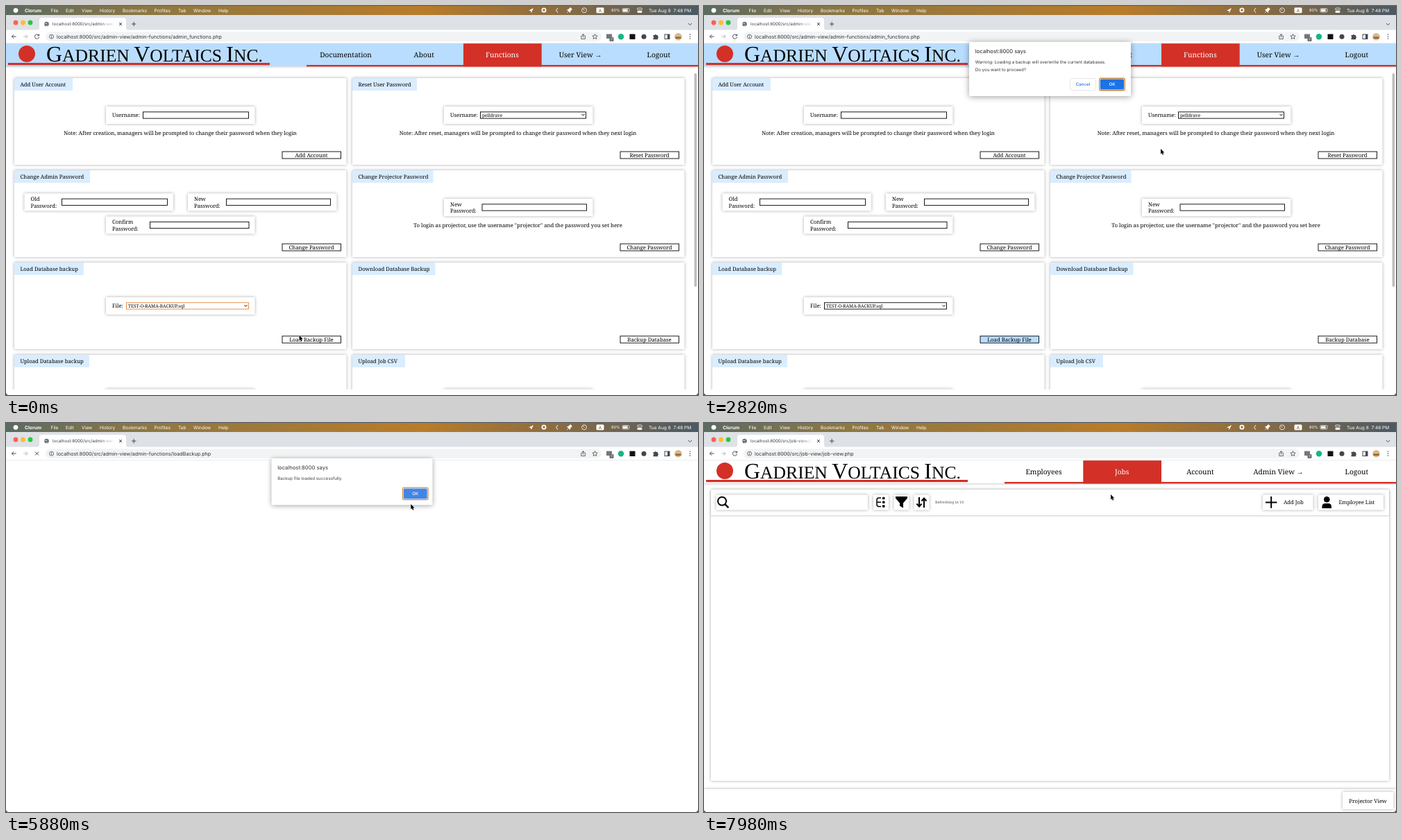
These frames come from a looping animation (997x561 px, 8000 ms). An HTML page:

```html
<!DOCTYPE html>
<html lang="en">
<head>
<meta charset="utf-8">
<title>Database backup</title>
<style>
html, body { margin: 0; width: 100%; height: 100%; overflow: hidden; background: #fff; text-rendering: geometricPrecision; }
svg { position: absolute; left: 0; top: 0; }
text { font-family: "Noto Serif", serif; white-space: pre; }
.ui text { font-family: Inter, sans-serif; }
.soft { filter: drop-shadow(0 0 2.1px #0005); }
.icon { fill: none; stroke: #444a50; stroke-width: 1; }
.mid { text-anchor: middle; }
#dump { position: absolute; left: 4.2px; top: 58px; width: 981px; height: 503px; overflow: hidden;
  font: 8.31px/9.35px "Liberation Serif", serif; }
</style>
</head>
<body>
<div id="dump">
string(27999) "-- MySQL dump 10.13 Distrib 8.0.33, for Linux (x86_64) -- -- Host: mysql-server Database: GV_Schema -- ------------------------------------------------------ -- Server version 8.0.33 /*!40101 SET @OLD_CHARACTER_SET_CLIENT=@@CHARACTER_SET_CLIENT */;<br>
/*!40101 SET @OLD_CHARACTER_SET_RESULTS=@@CHARACTER_SET_RESULTS */; /*!40101 SET @OLD_COLLATION_CONNECTION=@@COLLATION_CONNECTION */; /*!50503 SET NAMES utf8mb4 */; /*!40103 SET @OLD_TIME_ZONE=@@TIME_ZONE */; /*!40103 SET TIME_ZONE='+00:00' */; /*!40014 SET @OLD_UNIQUE_CHECKS=@@UNIQUE_CHECKS, UNIQUE_CHECKS=0 */; /*!40014 SET @OLD_FOREIGN_KEY_CHECKS=@@FOREIGN_KEY_CHECKS, FOREIGN_KEY_CHECKS=0 */; /*!40101 SET @OLD_SQL_MODE=@@SQL_MODE, SQL_MODE='NO_AUTO_VALUE_ON_ZERO' */; /*!40111 SET @OLD_SQL_NOTES=@@SQL_NOTES, SQL_NOTES=0 */; -- -- Table structure for table `assignments` -- DROP TABLE IF EXISTS `assignments`; /*!40101 SET @saved_cs_client = @@character_set_client */; /*!50503 SET character_set_client = utf8mb4 */; CREATE TABLE `assignments` ( `assignment_id` int NOT NULL AUTO_INCREMENT, `employee_id` int DEFAULT NULL, `job_id` int DEFAULT NULL, `start_date` date DEFAULT NULL, `end_date` date DEFAULT NULL, `assigner` int DEFAULT NULL, PRIMARY KEY (`assignment_id`), KEY `employee_id` (`employee_id`), KEY `job_id` (`job_id`), KEY `assigner` (`assigner`), CONSTRAINT `assignments_ibfk_1` FOREIGN KEY (`employee_id`) REFERENCES `employee` (`id`) ON DELETE CASCADE, CONSTRAINT `assignments_ibfk_2` FOREIGN KEY (`job_id`) REFERENCES `job` (`id`) ON DELETE CASCADE, CONSTRAINT `assignments_ibfk_3` FOREIGN KEY (`assigner`) REFERENCES `user` (`id`) ON DELETE CASCADE ) ENGINE=InnoDB AUTO_INCREMENT=13 DEFAULT CHARSET=utf8mb4 COLLATE=utf8mb4_0900_ai_ci; /*!40101 SET character_set_client = @saved_cs_client */; -- -- Dumping data for table `assignments` -- LOCK TABLES `assignments` WRITE; /*!40000 ALTER TABLE `assignments` DISABLE KEYS */; INSERT INTO `assignments` VALUES <span id="assignments"></span>; /*!40000<br>
ALTER TABLE `assignments` ENABLE KEYS */; UNLOCK TABLES; -- -- Table structure for table `employee` -- DROP TABLE IF EXISTS `employee`; /*!40101 SET @saved_cs_client = @@character_set_client */; /*!50503 SET character_set_client = utf8mb4 */; CREATE TABLE `employee` ( `id` int NOT NULL AUTO_INCREMENT, `role` int DEFAULT NULL, `name` varchar(100) DEFAULT NULL, `active` int DEFAULT '0', `archived` date DEFAULT NULL, `img` varchar(200) DEFAULT 'img/emp/default.png', `birthday` date DEFAULT NULL, `phoneNum` varchar(15) DEFAULT '(000) 000-0000', `phoneNumSecondary` varchar(15) DEFAULT '(000) 000-0000', `notes` text, `email` varchar(200) DEFAULT 'Empty', `hired` date DEFAULT NULL, `redseal` int DEFAULT '0', PRIMARY KEY (`id`) ) ENGINE=InnoDB AUTO_INCREMENT=42 DEFAULT CHARSET=utf8mb4 COLLATE=utf8mb4_0900_ai_ci; /*!40101 SET character_set_client = @saved_cs_client */; -- -- Dumping data for table `employee` -- LOCK TABLES `employee` WRITE; /*!40000 ALTER TABLE `employee` DISABLE KEYS */; INSERT INTO<br>
`employee` VALUES <span id="employees"></span>; /*!40000 ALTER TABLE `employee` ENABLE KEYS */; UNLOCK TABLES; <span id="triggers"></span> -- -- Table structure for table `job` -- DROP TABLE IF EXISTS `job`; /*!40101 SET @saved_cs_client = @@character_set_client */; /*!50503 SET character_set_client = utf8mb4 */; CREATE TABLE `job` ( `id` int NOT NULL AUTO_INCREMENT, `title` varchar(255) DEFAULT NULL, `address` varchar(255) DEFAULT NULL, `archived` date DEFAULT NULL, `manager_name` varchar(255) DEFAULT NULL, `start_date` date DEFAULT NULL, `end_date` date DEFAULT NULL, `notes` text, PRIMARY KEY (`id`) ) ENGINE=InnoDB AUTO_INCREMENT=21 DEFAULT CHARSET=utf8mb4 COLLATE=utf8mb4_0900_ai_ci; /*!40101 SET character_set_client = @saved_cs_client */; -- -- Dumping data for table `job` -- LOCK TABLES `job` WRITE; /*!40000 ALTER TABLE `job` DISABLE KEYS */; INSERT INTO `job` VALUES (1,'Plumbrook Annex Building','000 Quelder St.',NULL,'Orlen Vastry','2023-01-01','2024-04-01',NULL);
</div>
<svg id="stage" width="997" height="561" viewBox="0 0 997 561"></svg>
<script>
const RED = '#d33027', SKY = '#b9ddfe', PALE = '#d9edff', BLUE = '#1a73e8';
const $ = id => document.getElementById(id);

const text = (x, y, s, size = 7.75, attrs = '') => `<text x="${x}" y="${y}" font-size="${size}" ${attrs}>${s}</text>`;
const mid = (x, y, s, size, attrs = '') => text(x, y, s, size, `class="mid" ${attrs}`);
const rect = (x, y, w, h, fill = '#fff', attrs = '') => `<rect x="${x}" y="${y}" width="${w}" height="${h}" fill="${fill}" ${attrs}/>`;
const circle = (x, y, r, fill, attrs = '') => `<circle cx="${x}" cy="${y}" r="${r}" fill="${fill}" ${attrs}/>`;
const path = (d, attrs = 'class="icon"') => `<path d="${d}" ${attrs}/>`;
const group = (id, body, attrs = '') => `<g id="${id}" ${attrs}>${body}</g>`;
const panel = (x, y, w, h) => rect(x, y, w, h, '#fff', 'class="soft"');
const field = (x, y, w, id = '') => rect(x, y, w, 9.3, '#fff', `id="${id}" stroke="#000" stroke-width=".9"`);
const arrow = (x, y) => path(`M${x - 2} ${y - 1}l2 2 2-2`, 'fill="none" stroke="#000"');

// Database dump
let seed = 7;
const random = n => (seed = seed * 16807 % 2147483647) % n;
const two = n => String(n).padStart(2, '0');
const date = (from, span) => `'${from + random(span)}-${two(1 + random(12))}-${two(1 + random(28))}'`;
const rows = (n, make) => Array.from({ length: n }, (_, i) => `(${make(i + 1)})`).join(',');
const first = ['Orlen', 'Tavia', 'Bresmund', 'Joriel', 'Kelvane', 'Mirette', 'Dastin'];
const last = ['Vastry', 'Pellowen', 'Grindal', 'Humbrel', 'Corvash', 'Lindrow', 'Tespar', 'Wexmoor', 'Adrowe'];
$('assignments').textContent = rows(12, i =>
  `${i},${1 + (i - 1) % 4},${Math.ceil(i / 4)},'202${1 + i % 2}-0${1 + i % 2}-01','2023-0${1 + i % 5}-01',${1 + i % 2}`);
$('employees').textContent = rows(41, i =>
  `${i},${i % 5},'${first[i % 7]} ${last[i % 9]}',0,NULL,'img/emp/default.png',${date(1972, 26)},` +
  `'(000) 555-01${two(random(100))}','(000) 000-0000',NULL,'Empty',${date(2010, 13)},0`);

const set = (...list) => list.map(s => `/*!50003 SET ${s} */ ; `).join('');
const trigger = (name, when, code) => set('@saved_cs_client = @@character_set_client',
  '@saved_cs_results = @@character_set_results', '@saved_col_connection = @@collation_connection',
  'character_set_client = latin1', 'character_set_results = latin1', 'collation_connection = latin1_swedish_ci',
  '@saved_sql_mode = @@sql_mode',
  "sql_mode = 'ONLY_FULL_GROUP_BY,STRICT_TRANS_TABLES,NO_ZERO_IN_DATE,NO_ZERO_DATE,ERROR_FOR_DIVISION_BY_ZERO,NO_ENGINE_SUBSTITUTION'") +
  'DELIMITER ;; /*!50003 CREATE*/ /*!50017 DEFINER=`root`@`localhost`*/ /*!50003 TRIGGER `' + name + '` ' + when +
  ' ON `employee` FOR EACH ROW ' + code + ' */;; DELIMITER ; ' + set('sql_mode = @saved_sql_mode',
  'character_set_client = @saved_cs_client', 'character_set_results = @saved_cs_results',
  'collation_connection = @saved_col_connection');
const touch = "UPDATE update_time SET last_update=CURRENT_TIMESTAMP() WHERE table_name LIKE 'employee'";
$('triggers').textContent =
  trigger('set_active_before_insert', 'BEFORE INSERT', 'BEGIN IF NEW.archived IS NOT NULL THEN SET NEW.active = -1; END IF; END') +
  trigger('emp_insert', 'AFTER INSERT', touch) +
  trigger('set_active_before_update', 'BEFORE UPDATE', 'BEGIN IF NEW.active = -1 AND OLD.archived IS NULL THEN SET NEW.archived = CURRENT_DATE(); END IF; END') +
  trigger('emp_update', 'AFTER UPDATE', touch);

// Browser window and menu bar
const menu = [['File', 64.5], ['Edit', 86], ['View', 109], ['History', 135], ['Bookmarks', 168], ['Profiles', 213.5],
  ['Tab', 248], ['Window', 270], ['Help', 306]];
const white = 'fill="none" stroke="#fff"';
const browser = group('browser',
  rect(0, 0, 997, 13, 'url(#bar)') + circle(14, 6.3, 3.4, '#fff') +
  `<g fill="#fff">${text(27, 8.6, 'Clorum', 6.75, 'font-weight="700"')}${menu.map(([s, x]) => text(x, 8.6, s, 6.6)).join('')}
  ${text(872, 8.4, '80%', 5.7)}${text(926, 8.6, 'Tue Aug 8  7:48 PM', 6.6)}</g>` +
  path('M753 6.5l7-3.5-3.3 7-.6-3z', 'fill="#fff"') + circle(775, 6, 2.6, 'none', 'stroke="#fff" stroke-width="1.8"') +
  path('M795 3l-2.5 3.3 2.5 3.3', white) + path('M808 10l3-3m-2.5-1.5l4 4 .5-2.5 2.5-2.3-2.5-2.5-2.2 2.6z', 'fill="#fff" stroke="#fff" stroke-width=".7"') +
  circle(833, 6.2, 3.5, 'none', 'stroke="#fff" stroke-width=".8"') + path('M831.5 4.5l1.7 1.8', white) +
  rect(850.5, 2.3, 11, 8, '#fff', 'rx="1.5"') + mid(856, 8.7, 'A', 6.3, 'fill="#66583f"') +
  rect(888, 3.5, 10, 5.4, 'none', 'rx="1.4" stroke="#fff" stroke-width=".7"') + rect(889, 4.5, 6.7, 3.4, '#fff') +
  rect(909.5, 3, 7, 2.7, 'none', 'rx="1.3" stroke="#fff" stroke-width=".8"') + rect(909.5, 7, 7, 2.7, '#fff', 'rx="1.3"') +
  rect(0, 13, 997, 22, '#dee1e6') + rect(0, 34.5, 997, 19.5) +
  path('M44 35q4 0 4-4v-10q0-4 4-4h117q4 0 4 4v10q0 4 4 4z', 'fill="#fff"') +
  circle(14, 24, 3.4, '#ff5f57') + circle(24.5, 24, 3.4, '#febc2e') + circle(35, 24, 3.4, '#28c840') +
  circle(58.5, 26, 3.2, '#5f6368') + path('M56 25l2 1 1.5-2M58 29l2-2', 'fill="none" stroke="#fff" stroke-width=".8"') +
  text(67, 28.3, '', 6.2, 'id="tab" fill="#3c4043"') + rect(136, 20, 24, 13, 'url(#fade)') +
  path('M163 24l4 4m0-4l-4 4M181 26h6.4m-3.2-3.2v6.4M983 25l2.5 2.5 2.5-2.5') +
  rect(57, 37.3, 801, 13.8, '#f1f3f4', 'rx="6.9"') +
  path('M14.5 44h-6m2.7-2.8l-2.8 2.8 2.8 2.8') + path('M25 44h6m-2.7-2.8l2.8 2.8-2.8 2.8', 'class="icon" style="stroke:#b4b7ba"') +
  path('M47 42.2a3.1 3.1 0 1 0 .5 2.6M47.7 40.5v2.4h-2.4', 'id="reload" class="icon"') + path('M42 41.5l5 5m0-5l-5 5', 'id="stop" class="icon"') +
  circle(65.5, 44.2, 3, 'none', 'stroke="#444a50" stroke-width=".8"') + path('M65.5 43.8v2M65.5 42.2v.7') +
  text(73, 46.6, '', 7.2, 'id="url" fill="#303338"') +
  path('M830.5 43h-1.7v4.5h5.6V43h-1.7M831.6 45.5v-5m-1.6 1.5l1.6-1.6 1.6 1.6', 'class="icon" style="stroke-width:.8"') +
  path('M848.5 40.5l1 2.4 2.7.2-2 1.8.6 2.6-2.3-1.4-2.3 1.4.6-2.6-2-1.8 2.7-.2z', 'class="icon" style="stroke-width:.8"') +
  rect(865, 40.5, 8, 6.5, '#747779') + rect(869.5, 45, 6, 6, '#6a6d70', 'rx="1"') + mid(872.5, 49.7, '7', 4.8, 'fill="#fff"') +
  circle(886, 44.2, 4.2, '#16b587') + rect(898.5, 40.5, 8, 7.5, '#111') + circle(919, 44.2, 3.5, '#44474a') +
  path('M932.5 42h2a1.4 1.4 0 0 1 2.6 0h2v2a1.4 1.4 0 0 1 0 2.6v1.6h-6.6v-2a1.3 1.3 0 0 0 0-2.4z', 'fill="#444a50"') +
  rect(949, 41, 7, 6.5, 'none', 'class="icon"') + rect(953, 41, 3, 6.5, '#444a50') +
  circle(968.5, 44.2, 5.3, '#d8b98a') + rect(964.5, 44.5, 8, 2.5, '#94613e') +
  [41, 44, 47].map(y => circle(985.5, y, 0.8, '#444a50')).join('') + rect(0, 53.5, 997, 0.6, '#dcdee1'), 'class="ui"');

// Pages
const header = (labels, active, bg) =>
  rect(0, 54, 997, 33, bg, 'style="filter:drop-shadow(0 1px 1.5px #0003)"') + rect(433, 85, 564, 2.4, RED) +
  rect(433.6 + active * 112.7, 54, 112.7, 33.4, RED) +
  labels.map((s, i) => mid(489.5 + i * 112.7, 74, s, 10.15, i === active ? 'fill="#fff"' : '')).join('') +
  circle(30, 69, 12, RED) + rect(3, 82, 377, 3.2, RED) +
  `<text x="58" y="80" font-size="25.6" style="font-family:'Liberation Serif',serif">${
    [['G', 'ADRIEN '], ['V', 'OLTAICS '], ['I', 'NC.']].map(([a, b]) => `<tspan font-size="32">${a}</tspan>${b}`).join('')}</text>`;

const card = (column, row, title, labelWidth, button, id = '') => {
  const x = 12 + column * 487, y = 104 + row * 133;
  return panel(x, y, 478.5, 125) + rect(x, y, labelWidth, 18, PALE) + text(x + 8.5, y + 12, title) +
    (button ? rect(x + 386, y + 106, 84.5, 10, '#fff', `id="${id}" stroke="#000" stroke-width=".9"`) + mid(x + 428, y + 114, button) : '');
};
const entry = (x, y, lines, fieldX, fieldW, id) => panel(x, y, 214.5, 25) +
  lines.map((s, i) => text(x + 9, y + (lines[1] ? 10.7 + i * 9.5 : 15), s)).join('') + field(fieldX, y + 7.8, fieldW, id);

const admin = group('admin', header(['Documentation', 'About', 'Functions', 'User View →', 'Logout'], 2, SKY) +
  `<g clip-path="url(#scroll)">` +
  card(0, 0, 'Add User Account', 84, 'Add Account') + card(1, 0, 'Reset User Password', 93, 'Reset Password') +
  card(0, 1, 'Change Admin Password', 109, 'Change Password') + card(1, 1, 'Change Projector Password', 116.5, 'Change Password') +
  card(0, 2, 'Load Database backup', 100, 'Load Backup File', 'load') + card(1, 2, 'Download Database Backup', 119.5, 'Backup Database') +
  card(0, 3, 'Upload Database backup', 108) + card(1, 3, 'Upload Job CSV', 76) +
  entry(144, 145, ['Username:'], 197.5, 152) + entry(631, 145, ['Username:'], 683.5, 152) +
  text(686, 159.7, 'pelldrave', 6.5) + arrow(831.5, 157) +
  mid(251, 186, 'Note: After creation, managers will be prompted to change their password when they login') +
  mid(737.5, 186, 'Note: After reset, managers will be prompted to change their password when they next login') +
  entry(26.5, 270.3, ['Old', 'Password:'], 80.5, 152) + entry(262, 270.3, ['New', 'Password:'], 317.5, 150) +
  entry(144, 303.5, ['Confirm', 'Password:'], 207.5, 142.5) + entry(631, 278, ['New', 'Password:'], 686, 150.5) +
  mid(737.5, 319, 'To login as projector, use the username "projector" and the password you set here') +
  entry(144, 420, ['File:'], 173.5, 176, 'file') + text(176, 434.8, 'TEST-O-RAMA-BACKUP.sql', 6.5) + arrow(345.5, 432.3) +
  panel(144, 552.5, 214.5, 25) + panel(631, 552.5, 214.5, 25) + '</g>' + rect(991.6, 97, 3.6, 308, '#bdbdbd', 'rx="1.8"'));

const jobs = group('jobs', header(['Employees', 'Jobs', 'Account', 'Admin View →', 'Logout'], 1, '#fff') +
  panel(10, 96, 977, 420) + rect(10, 96, 977, 37, '#fff', 'style="filter:drop-shadow(0 1px 1px #0003)"') +
  panel(17.5, 103.5, 218.5, 22) + [244, 273.5, 302.5].map(x => panel(x, 103.5, 22, 22)).join('') +
  panel(805, 103.5, 72.5, 22) + panel(885, 103.5, 94, 22) +
  circle(26, 112.8, 6, 'none', 'stroke="#000" stroke-width="2"') + path('M30.3 117.2l5 5', 'stroke="#000" stroke-width="2.4"') +
  path('M255 108h-3q-3 0-3 3v6.5q0 3 3 3h3M249 114.3h6', 'fill="none" stroke="#000" stroke-width="1.5"') +
  [108.5, 114.3, 120].map(y => rect(257, y - 1.7, 3.5, 3.4, '#000', 'rx="1"')).join('') +
  path('M276 106h17v2.5l-6 7v7l-5-3v-4l-6-7z', '') +
  path('M310 107v13m-3.5-3.5l3.5 4 3.5-4M317 122v-13m-3.5 3.5l3.5-4 3.5 4', 'fill="none" stroke="#000" stroke-width="2"') +
  text(333, 116, 'Refreshing in 10', 5.3, 'fill="#555"') +
  path('M809 114.4h16.5M817.2 106v16.8', 'stroke="#000" stroke-width="2"') + text(835, 117.3, 'Add Job') +
  circle(897.3, 110.3, 4.3, '#000') + path('M890.5 123v-2.5q0-4.5 4.5-4.5h4.5q4.5 0 4.5 4.5v2.5z', '') + text(914.5, 117.3, 'Employee List') +
  rect(0, 528, 997, 33, '#fff', 'class="soft"') + panel(920, 532, 73.5, 25) + mid(956.5, 547.5, 'Projector View'));

// Dialogs
const okButton = (x, y) => rect(x - 18.3, y - 8.7, 36.6, 17.4, '#fff', 'rx="2" stroke="#c98a45" stroke-width="1.4"') +
  rect(x - 17, y - 7.4, 34, 14.8, BLUE, 'class="ok" rx="1.5"') + mid(x, y + 2.2, 'OK', 6.2, 'fill="#fff" font-weight="500"');
const dialog = (id, height, lines, body) => group(id,
  rect(382, 52, 233, height, '#fff', 'rx="2" style="filter:drop-shadow(0 1px 4px #0006)"') +
  text(390.7, 68.4, 'localhost:8000 says', 7.7, 'fill="#202124"') +
  lines.map((s, i) => text(390.7, 83.3 + i * 10.6, s, 6.2, 'fill="#303338"')).join('') + body, 'class="ui"');

$('stage').innerHTML = `<defs>
  <linearGradient id="bar"><stop stop-color="#5b6a62"/><stop offset=".2" stop-color="#8d7743"/><stop offset=".6" stop-color="#b97c29"/>
    <stop offset=".8" stop-color="#8a6c42"/><stop offset="1" stop-color="#4b5963"/></linearGradient>
  <linearGradient id="fade"><stop stop-color="#fff" stop-opacity="0"/><stop offset=".85" stop-color="#fff"/></linearGradient>
  <clipPath id="scroll"><rect y="88" width="997" height="465"/></clipPath></defs>` +
  admin + jobs + rect(991.6, 56, 3.6, 245, '#bdbdbd', 'id="thumb" rx="1.8"') + browser +
  dialog('confirm', 78, ['Warning: Loading a backup will overwrite the current databases.', 'Do you want to proceed?'],
    rect(527.5, 104.6, 37, 17, '#fff', 'rx="2" stroke="#dadce0" stroke-width=".7"') +
    mid(546, 115.3, 'Cancel', 6.2, `fill="${BLUE}" font-weight="500"`) + okButton(588, 113)) +
  dialog('alert', 67.5, ['Backup file loaded successfully.'], okButton(590.2, 103)) +
  path('M0 557q0 4 4 4h-4zM997 557q0 4-4 4h4z', 'fill="#333"') +
  path('M0 0V7.6L1.7 6.1 2.8 8.7 4.1 8.1 3 5.6H5.3Z', 'id="cursor" stroke="#fff" stroke-width=".9" paint-order="stroke"');

// Timeline, in milliseconds
const LOOP = 8000, FADE = 150;
const T = { hover: 330, click: 1450, ask: 1530, accept: 5480, loading: 5560, blank: 5730, done: 5745, dismiss: 6945, dump: 6990, jobs: 7200, loaded: 7450 };
const route = [[0, 422.5, 475], [250, 422.5, 475], [450, 422.7, 480], [1750, 422.7, 480], [2700, 658, 206],
  [3100, 658, 206], [4200, 583, 116], [4900, 583, 116], [5300, 583.3, 117], [6250, 583.3, 117], [6650, 586, 103], [LOOP, 586, 103]];
const clamp = v => Math.max(0, Math.min(1, v));
const show = (id, on) => { $(id).style.display = on ? '' : 'none'; };

function position(t) {
  const i = route.findIndex(stop => stop[0] > t);
  const [t0, x0, y0] = route[i - 1], [t1, x1, y1] = route[i];
  const p = (t - t0) / (t1 - t0), e = p * p * (3 - 2 * p);
  return [x0 + (x1 - x0) * e, y0 + (y1 - y0) * e];
}

function pose(id, t, opens, closes) {
  const e = Math.min(clamp((t - opens) / FADE), 1 - clamp((t - closes) / FADE));
  show(id, e > 0);
  $(id).setAttribute('opacity', e);
  $(id).setAttribute('transform', `translate(498.5 ${52 - 10 * (1 - e)}) scale(${0.95 + 0.05 * e}) translate(-498.5 -52)`);
}

function frame(now) {
  const t = now % LOOP;
  const dumping = t >= T.dump && t < T.jobs, loading = t >= T.loading && t < T.loaded;
  show('admin', t < T.blank);
  show('dump', dumping);
  show('thumb', dumping);
  show('jobs', t >= T.jobs);
  show('reload', !loading);
  show('stop', loading);
  $('load').setAttribute('fill', t >= T.hover ? SKY : '#fff');
  $('file').setAttribute('stroke', t < T.click ? '#e8853a' : '#000');
  $('tab').textContent = 'localhost:8000/src/' + (t < T.dump ? 'admin-view' : 'job-view/jo');
  $('url').textContent = 'localhost:8000/src/' + (t < T.blank ? 'admin-view/admin-functions/admin_functions.php'
    : t < T.dump ? 'admin-view/admin-functions/loadBackup.php' : 'job-view/job-view.php');
  pose('confirm', t, T.ask, T.accept);
  pose('alert', t, T.done, T.dismiss);
  const [x, y] = position(t);
  $('cursor').setAttribute('transform', `translate(${x} ${y})`);
  const hovering = x > 570 && x < 607 && y > 94 && y < 121;
  document.querySelectorAll('.ok').forEach(ok => ok.setAttribute('fill', hovering ? '#3079e3' : BLUE));
  requestAnimationFrame(frame);
}
requestAnimationFrame(frame);
</script>
</body>
</html>
```
